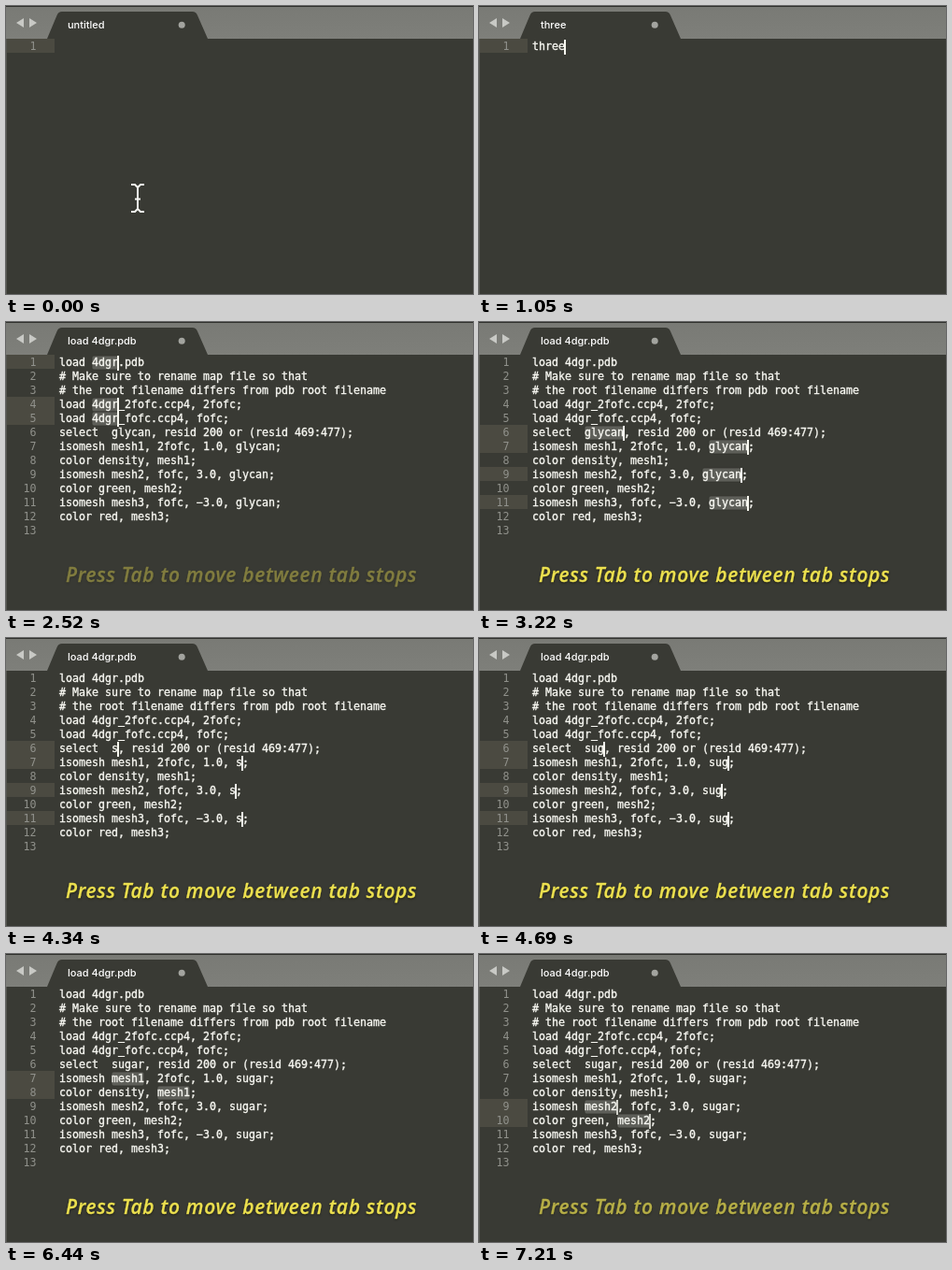
An HTML page for the animation above (7.28 s loop, 500 px wide and 308 px high).

```html
<!DOCTYPE html>
<html lang="en">
<head>
<meta charset="utf-8">
<title>Snippet tab stops</title>
<style>
  html, body { margin: 0; width: 100%; height: 100%; overflow: hidden; background: #393a34; }
  svg { display: block; width: 500px; height: 308px; }
  text { white-space: pre; }
  #tabTitle { font: 500 11px Inter, sans-serif; fill: #fff; }
  #editor text {
    font: 11.63px "DejaVu Sans Mono", monospace;
    fill: #f8f8f2; stroke: #f8f8f2; stroke-width: .35px;
  }
  #editor .number { fill: #90918b; stroke: none; text-anchor: end; }
  #caption {
    font: italic 600 21px "Open Sans", sans-serif; letter-spacing: .69px;
    fill: #ece04f; stroke: #ece04f; stroke-width: .3px;
    filter: drop-shadow(0 1px 1px #1c1c14);
  }
</style>
</head>
<body>
<svg viewBox="0 0 500 308">
  <defs>
    <linearGradient id="bar" x2="0" y2="1">
      <stop stop-color="#797a75"/><stop offset="1" stop-color="#7e7f7a"/>
    </linearGradient>
  </defs>
  <rect width="500" height="308" fill="#393a34"/>
  <rect width="500" height="35" fill="url(#bar)"/>
  <rect width="500" height="1" fill="#30312d"/>
  <path d="M44 35L54.500 10Q56 6 60 6H199.500Q203.500 6 205 10L216 35Z" fill="#393a34"/>
  <path d="M19 13V23L11 18ZM25 13V23L33 18Z" fill="#c8c9c5"/>
  <circle cx="188.200" cy="20.200" r="3.500" fill="#a3a49f"/>
  <text id="tabTitle" x="66" y="24"></text>
  <g id="editor"></g>
  <rect y="35" width="1" height="273" fill="#555650"/>
  <path id="pointer" d="M134 191H138L141 194L144 191H148M141 194V217M138 206.500H144M134 220H138L141 217L144 220H148"
    fill="none" stroke="#f4f4f0" stroke-width="2"/>
  <text id="caption" x="64" y="277.500">Press Tab to move between tab stops</text>
</svg>
<script>
const LOOP = 7280, STEP = 70;
const LEFT = 57, TOP = 35, CHAR = 7, LINE = 15;
const $ = id => document.getElementById(id);

// Moments at which one more letter appears in the code, and in the tab title.
const WORD = 'threeMaps';
const wordKeys = [350, 490, 630, 840, 980, 1260, 1400, 1540, 1750];
const titleKeys = [420, 560, 700, 840, 1050, 1330, 1470, 1610, 1820];
const sugarKeys = [4340, 4480, 4690, 4760, 4970];
const EXPAND = 2170;

// Each pair: carets light up, carets start to fade.
const blinks = [[350, 2100], [2170, 2590], [3080, 3640], [4200, 5390], [5880, 6230], [6720, 7210]];
const fade = [.8, .3, 0];
const captionIn = [.4, .6, .8, .93, 1];

const pressed = (keys, t) => keys.filter(k => k <= t).length;

const snippet = name => [
  'load 4dgr.pdb',
  '# Make sure to rename map file so that',
  '# the root filename differs from pdb root filename',
  'load 4dgr_2fofc.ccp4, 2fofc;',
  'load 4dgr_fofc.ccp4, fofc;',
  `select  ${name}, resid 200 or (resid 469:477);`,
  `isomesh mesh1, 2fofc, 1.0, ${name};`,
  'color density, mesh1;',
  `isomesh mesh2, fofc, 3.0, ${name};`,
  'color green, mesh2;',
  `isomesh mesh3, fofc, \u22123.0, ${name};`,
  'color red, mesh3;',
  ''
];

function editorState(t) {
  if (t < EXPAND) {
    const typed = WORD.slice(0, pressed(wordKeys, t));
    return { lines: [typed], field: typed, rows: [0], selected: false };
  }
  const letters = pressed(sugarKeys, t);
  const name = letters ? 'sugar'.slice(0, letters) : 'glycan';
  const lines = snippet(name);
  const stop = (field, rows, selected = true) => ({ lines, field, rows, selected });
  if (t < 3220) return stop('4dgr', [0, 3, 4]);
  if (t < 5880) return stop(name, [5, 6, 8, 10], !letters);
  if (t < 6790) return stop('mesh1', [6, 7]);
  return stop('mesh2', [8, 9]);
}

function caretOpacity(t) {
  const blink = blinks.filter(([on]) => on <= t).pop();
  if (!blink) return 0;
  return t < blink[1] ? 1 : fade[(t - blink[1]) / STEP] ?? 0;
}

function captionOpacity(t) {
  if (t < 2520) return 0;
  if (t >= 7210) return .7;
  return captionIn[(t - 2520) / STEP] ?? 1;
}

const rect = (x, y, w, h, fill, extra = '') =>
  `<rect x="${x}" y="${y}" width="${w}" height="${h}" fill="${fill}" ${extra}/>`;

function drawEditor(t) {
  const { lines, field, rows, selected } = editorState(t);
  const wholeField = new RegExp(`\\b${field}(?![a-z])`);
  const opacity = caretOpacity(t);
  let back = '', text = '', carets = '';
  for (const row of rows) {
    const y = TOP + row * LINE;
    const start = LEFT + lines[row].search(wholeField) * CHAR;
    const width = field.length * CHAR;
    back += rect(0, y, 52, LINE, '#4b4a41');
    if (selected) back += rect(start, y + 1, width, LINE, '#5e5f59', 'rx="2" stroke="#33342e" stroke-width=".8"');
    carets += rect(start + width - 1, y + 1, 2, 16, '#f8f8f0', `opacity="${opacity}"`);
  }
  lines.forEach((line, i) => {
    const y = TOP + i * LINE + 12;
    text += `<text class="number" x="32.500" y="${y}">${i + 1}</text><text x="${LEFT}" y="${y}">${line}</text>`;
  });
  $('editor').innerHTML = back + text + carets;
}

function draw(t) {
  drawEditor(t);
  $('tabTitle').textContent = t >= EXPAND + STEP ? 'load 4dgr.pdb'
    : WORD.slice(0, pressed(titleKeys, t)) || 'untitled';
  $('pointer').style.display = t < 350 ? '' : 'none';
  $('caption').style.opacity = captionOpacity(t);
}

let shown = -1;
function tick() {
  const t = Math.floor(performance.now() % LOOP / STEP) * STEP;
  if (t !== shown) draw(shown = t);
  requestAnimationFrame(tick);
}
tick();
</script>
</body>
</html>
```
